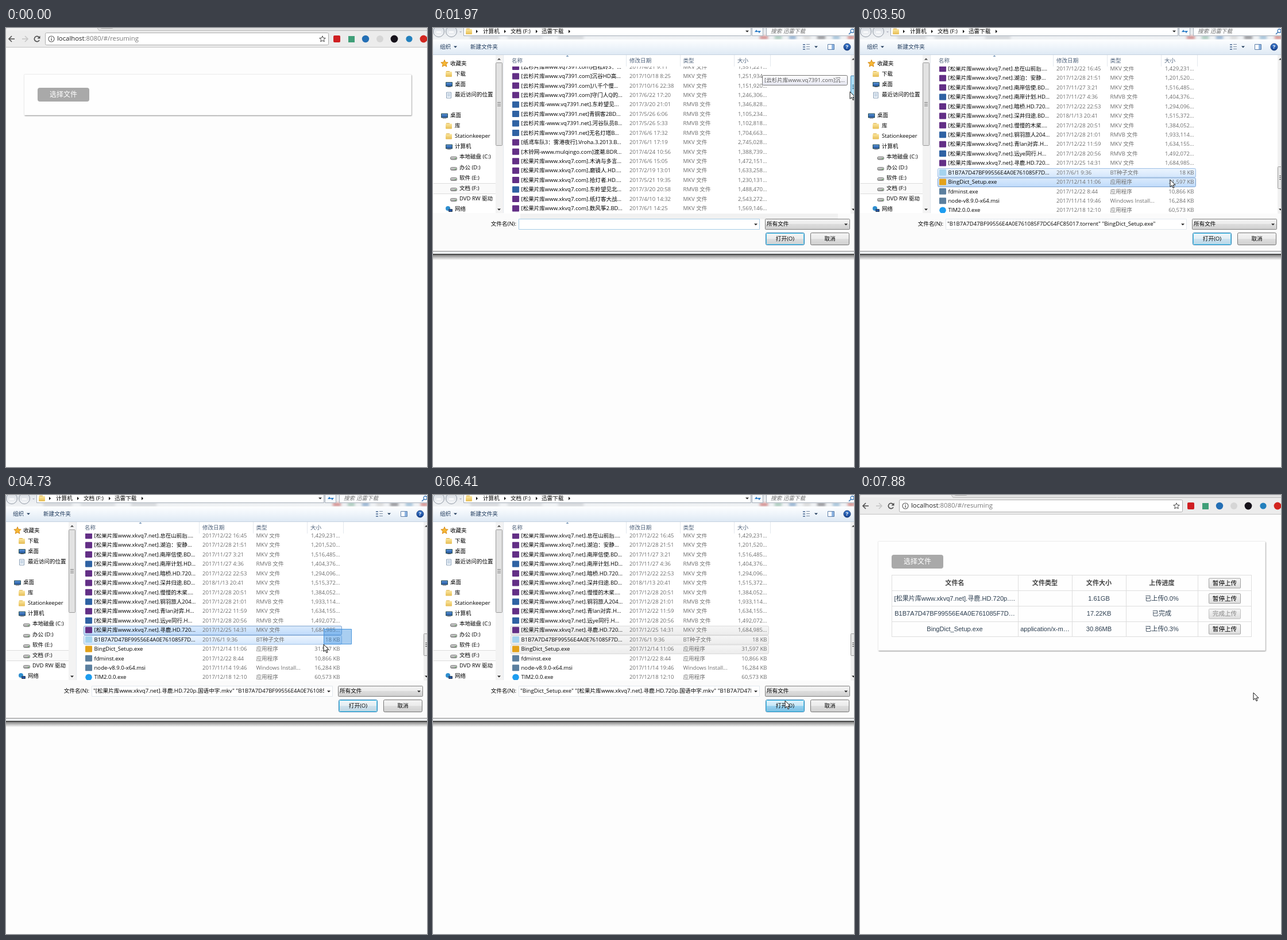
Animation of 733 by 764 pixels, one loop 8 s. Source, as an HTML page with a canvas:

```html
<!DOCTYPE html>
<html lang="zh">
<head>
<meta charset="utf-8">
<title>resuming</title>
<style>
html, body { margin: 0; width: 100%; height: 100%; overflow: hidden; background: #fdfdfd; }
canvas { display: block; }
</style>
</head>
<body>
<canvas id="stage" width="733" height="764"></canvas>
<script>
const ctx = document.getElementById('stage').getContext('2d');
const LOOP = 8000;
const UI = '"Open Sans", "Noto Sans CJK SC", sans-serif';
const WEB = '"Liberation Sans", "Noto Sans CJK SC", sans-serif';

// Runs of evenly spaced updates: start, gap, count
const RUNS = [[310, 134, 8], [1400, 142, 5], [2120, 120, 3], [2480, 145, 8], [3620, 137, 8],
  [4730, 150, 5], [5630, 130, 7], [6560, 120, 1], [6680, 132, 8], [7760, 120, 2]];
const OPEN = 846, CLOSE = 6560, START = 7470;

// Pointer path: time, x, y
const PATH = [[310, 240, 60], [712, 105, 114], [980, 105, 114], [1248, 190, 100], [1542, 600, 4],
  [1684, 728, 90], [1970, 726, 111], [2480, 697, 263], [2915, 600, 248], [3350, 540, 264],
  [3620, 540, 264], [4305, 602, 233], [4579, 575, 250], [4730, 553, 260], [4880, 548, 270],
  [5630, 548, 270], [6150, 613, 358], [6680, 613, 358], [7208, 640, 149], [7604, 640, 149], [7880, 685, 344]];
const SCROLL = [[1684, 0], [1970, 156], [2480, 1236]];
const DRAGS = [{ x: 600, y: 248, from: 2915, to: 3490 }, { x: 602, y: 233, from: 4305, to: 5030 }];

const PITCH = 16.43, ROWS = 103, MAX_SCROLL = ROWS * PITCH - 254;
const SITES = { A: '[云杉片库www.vq7391.com]', B: '[云杉片库-www.vq7391.net].', C: '[云杉片库www.vq7391.net]',
  D: '[木铃网-www.mulqingo.com]', E: '[松果片库www.xkvq7.com].', F: '[松果片库www.xkvq7.net].' };

const parse = list => list.trim().split('\n').map(line => {
  const [raw, date, size, type = 'MKV 文件', color] = line.split('|');
  const film = raw[1] === ' ';
  return {
    name: film ? (SITES[raw[0]] || '') + raw.slice(2) + '.国语中字.mkv' : raw,
    date, size: film ? size + '...' : size,
    type: type === 'R' ? 'RMVB 文件' : type,
    color: color || (type === 'R' ? '#2f62a3' : '#632f86')
  };
});

const early = parse(`
A 石松岭3：归乡|2017/4/21 9:11|1,551,221
A 沉谷HD高清|2017/10/18 8:25|1,251,934
A 八千个慢镜头|2017/10/16 22:38|1,151,920
A 守门人Q的来信|2017/6/22 17:20|1,246,306
B 东岭望见北湖|2017/3/20 21:01|1,346,828|R
C 青铜客2BD高清|2017/5/26 6:06|1,105,234|R
B 河谷队员BD|2017/5/26 5:33|1,102,818|R
C 无名灯塔BD高清|2017/6/6 17:32|1,704,663|R
- [纸鸢车队3：雾港夜行].Vroha.3.2013.BD|2017/6/1 17:19|2,745,028
D 渡潮.BDRip|2017/4/24 10:56|1,388,739
E 木讷与多言.HD|2017/6/6 15:05|1,472,151
E 磨镜人.HD.720p|2017/2/19 13:01|1,633,258
E 拾灯者.HD.720p|2017/5/21 19:35|1,230,131
E 东岭望见北湖|2017/3/20 20:58|1,488,470|R
E 纸灯客大战雨师|2017/4/10 14:32|2,543,272
E 数风筝2.BD.720p|2017/6/1 14:25|1,569,146`);

const late = parse(`
F 总在山前后.BD.720p|2017/12/22 16:45|1,429,231
F 湖泊：安静的一天|2017/12/28 21:51|1,201,520
F 南岸信使.BD.720p|2017/11/27 3:21|1,516,485
F 南岸计划.HD.720p|2017/11/27 4:36|1,404,376|R
F 暗桥.HD.720p|2017/12/22 22:53|1,294,096
F 深井归途.BD.720p|2018/1/13 20:41|1,515,372
F 慢慢的木桨.HD.720p|2017/12/28 20:51|1,384,052
F 铜羽旅人2047.HD|2017/12/28 21:01|1,933,114|R
F 青lan对弈.HD.720p|2017/12/22 11:59|1,634,155
F 远ye同行.HD.720p|2017/12/28 20:56|1,492,072|R
F 寻鹿.HD.720p|2017/12/25 14:31|1,684,985
B1B7A7D47BF99556E4A0E761085F7DC64FC85017.torrent|2017/6/1 9:36|18 KB|BT种子文件|#a5d3ee
BingDict_Setup.exe|2017/12/14 11:06|31,597 KB|应用程序|#e3a21a
fdminst.exe|2017/12/22 8:44|10,866 KB|应用程序|#5b7f9f
node-v8.9.0-x64.msi|2017/11/14 19:46|16,284 KB|Windows Install...|#5b7f9f
TIM2.0.0.exe|2017/12/18 12:10|60,573 KB|应用程序|#1d9df0`);

const rnd = (i, k) => { const v = Math.sin(i * 12.9 + k * 78.2) * 43758.5; return v - Math.floor(v); };

function fileRow(i) {
  if (i >= 9 && i < 25) return early[i - 9];
  if (i >= 75 && i < 91) return late[i - 75];
  const like = i < 9 ? early[i % 4] : late[Math.floor(rnd(i, 1) * 11)];
  const date = `2017/${1 + Math.floor(rnd(i, 2) * 12)}/${1 + Math.floor(rnd(i, 3) * 28)} ${Math.floor(rnd(i, 4) * 24)}:${10 + Math.floor(rnd(i, 5) * 50)}`;
  const size = (1e6 + Math.floor(rnd(i, 6) * 9e5)).toLocaleString('en-US') + '...';
  return { ...like, date, size };
}

// ---- timing ----
function snap(t) {
  let at = 0;
  for (const [start, gap, n] of RUNS)
    if (t >= start) at = start + gap * Math.min(n - 1, Math.floor((t - start) / gap));
  return at;
}

function track(keys, t) {
  const next = keys.findIndex(k => k[0] > t);
  if (next === 0) return keys[0].slice(1);
  if (next < 0) return keys[keys.length - 1].slice(1);
  const a = keys[next - 1], b = keys[next], p = (t - a[0]) / (b[0] - a[0]);
  return a.slice(1).map((v, i) => v + (b[i + 1] - v) * p);
}

// ---- drawing helpers ----
function box(x, y, w, h, fill, stroke, r = 0) {
  ctx.beginPath();
  if (stroke) ctx.roundRect(x + .5, y + .5, w - 1, h - 1, r); else ctx.roundRect(x, y, w, h, r);
  if (fill) { ctx.fillStyle = fill; ctx.fill(); }
  if (stroke) { ctx.strokeStyle = stroke; ctx.lineWidth = 1; ctx.stroke(); }
}

function disc(x, y, r, fill, stroke, width = 1) {
  ctx.beginPath();
  ctx.arc(x, y, r, 0, 7);
  if (fill) { ctx.fillStyle = fill; ctx.fill(); }
  if (stroke) { ctx.strokeStyle = stroke; ctx.lineWidth = width; ctx.stroke(); }
}

function shade(y0, y1, ...colors) {
  const g = ctx.createLinearGradient(0, y0, 0, y1);
  colors.forEach((c, i) => g.addColorStop(i / (colors.length - 1), c));
  return g;
}

// Two gradients that meet in a hard edge halfway
function gloss(y0, y1, a, b, c, d) {
  const g = ctx.createLinearGradient(0, y0, 0, y1);
  [[0, a], [.5, b], [.5, c], [1, d]].forEach(([p, color]) => g.addColorStop(p, color));
  return g;
}

function poly(points, fill, stroke, width = 1, open) {
  ctx.beginPath();
  points.forEach(([x, y]) => ctx.lineTo(x, y));
  if (!open) ctx.closePath();
  if (fill) { ctx.fillStyle = fill; ctx.fill(); }
  if (stroke) { ctx.strokeStyle = stroke; ctx.lineWidth = width; ctx.stroke(); }
}

function star(x, y, r, fill, stroke) {
  poly(Array.from({ length: 10 }, (_, i) => {
    const q = i % 2 ? r * .45 : r, a = i * Math.PI / 5;
    return [x + q * Math.sin(a), y - q * Math.cos(a)];
  }), fill, stroke);
}

function setFont(size, family, style = '') { ctx.font = `${style} ${size}px ${family}`; }

function text(s, x, y, color = '#000', align = 'left') {
  ctx.textAlign = align;
  ctx.textBaseline = 'middle';
  ctx.fillStyle = color;
  ctx.fillText(s, x, y);
}

function fit(s, width, dots = '...') {
  if (ctx.measureText(s).width <= width) return s;
  while (ctx.measureText(s + dots).width > width) s = s.slice(0, -1);
  return s + dots;
}

function clip(x, y, w, h, paint) {
  ctx.save();
  ctx.beginPath();
  ctx.rect(x, y, w, h);
  ctx.clip();
  paint();
  ctx.restore();
}

const down = (x, y, s = 3, c = '#222') => poly([[x - s, y - s / 2], [x + s, y - s / 2], [x, y + s / 2]], c);
const up = (x, y, s = 3, c = '#444') => poly([[x - s, y + s / 2], [x + s, y + s / 2], [x, y - s / 2]], c);
const right = (x, y) => poly([[x - 1, y - 3], [x + 2, y], [x - 1, y + 3]], '#111');

// ---- browser page ----
function browser() {
  box(0, 0, 733, 34, '#ececec');
  box(0, 0, 733, 4, '#e2e2e2');
  poly([[2, 0], [0, 4], [162, 4], [159, 0]], '#f2f2f2');
  poly([[159, 0], [162, 4.5], [733, 4.5]], null, '#b9b9b9', 1, true);
  box(164, -4, 23, 5, '#d6d6d6', '#a9a9a9', 2);
  box(0, 33, 733, 1, '#c3c3c3');
  const arrow = (x, d, c) => {
    poly([[x - 5 * d, 19], [x + 5 * d, 19]], null, c, 1.6, true);
    poly([[x, 14], [x + 5 * d, 19], [x, 24]], null, c, 1.6, true);
  };
  arrow(10, -1, '#505050');
  arrow(33, 1, '#c6c6c6');
  ctx.beginPath();
  ctx.arc(54, 19, 4.6, .5, 5.6);
  ctx.strokeStyle = '#505050';
  ctx.lineWidth = 1.6;
  ctx.stroke();
  poly([[59.5, 13.5], [59.5, 18.5], [54.5, 18.5]], '#505050');
  box(68, 8, 494, 22, '#fff', '#adadad', 2);
  disc(79, 19, 5, null, '#555', 1.1);
  box(78.4, 18, 1.3, 4, '#555');
  box(78.4, 15.8, 1.3, 1.3, '#555');
  setFont(11.35, UI);
  text('localhost', 89, 19, '#222');
  text(':8080/#/resuming', 89 + ctx.measureText('localhost').width, 19, '#777');
  star(551, 19.3, 5.5, null, '#444');
  box(570, 13, 12, 12, '#cf1f22', null, 2);
  box(596, 14, 11, 11, '#3f9f78');
  disc(626, 19, 6.2, '#246fb5');
  disc(651, 19, 6, '#d6d6d6');
  disc(676, 19, 6.4, '#16121a');
  disc(702, 19, 5.6, '#2380bd');
  disc(727, 19, 6.4, '#d3251f');
}

function card(h) {
  ctx.save();
  ctx.shadowColor = 'rgba(0,0,0,.42)';
  ctx.shadowBlur = 2;
  ctx.shadowOffsetX = ctx.shadowOffsetY = 1;
  box(31.5, 81, 674, h, '#fefefe', null, 1);
  ctx.restore();
  box(31, 80, 675, h + 1, '#fefefe', '#ebebeb', 1);
  box(55, 104, 90, 24, '#a9a9a9', null, 4);
  setFont(12, WEB);
  text('选择文件', 100, 116.5, '#fff', 'center');
}

function webButton(label, y, off) {
  box(607, y - 9, 56, 18, shade(y - 9, y + 9, '#f7f7f7', '#dcdcdc'), off ? '#c2c2c2' : '#a2a2a2', 1);
  setFont(10.6, WEB);
  text(label, 635, y + .5, off ? '#8a8a8a' : '#000', 'center');
}

function table(t) {
  const cols = [55, 275, 369, 463, 588, 682], lines = [139, 166, 193, 220, 246];
  const on = t >= START, done = t >= 7600;
  const pct = t >= 7880 ? '0.3' : t >= 7760 ? '0.1' : '0.0';
  const data = [['文件名', '文件类型', '文件大小', '上传进度'],
    [late[10].name, '', '1.61GB', '已上传0.0%'],
    [late[11].name, '', '17.22KB', done ? '已完成' : '已上传0.0%'],
    [late[12].name, 'application/x-msdownload', '30.86MB', `已上传${pct}%`]];
  lines.forEach(y => box(55, y, 627, 1, '#dedede'));
  cols.forEach(x => box(x - (x > 600 ? 1 : 0), 139, 1, 108, '#dedede'));
  data.forEach((cells, r) => {
    const y = 153.5 + r * 26.7;
    cells.forEach((s, c) => {
      setFont(11.1, WEB, r ? '' : 'bold');
      text(fit(s, cols[c + 1] - cols[c] - 7, '…'), (cols[c] + cols[c + 1]) / 2, y + .5, r ? '#2c3e50' : '#444', 'center');
    });
    const finished = r === 2 && done;
    webButton(finished ? '完成上传' : on ? '暂停上传' : '开始上传', y, finished);
  });
}

// ---- file dialog ----
function drive(x, y) {
  box(x, y - 1, 12, 6, shade(y - 1, y + 5, '#e6e6e6', '#8c8c8c'), '#777', 2);
  box(x + 8, y + 2, 2, 1, '#3a3');
}
function folder(x, y) {
  box(x + 1, y - 5, 6, 3, '#d9a93c');
  box(x, y - 4, 11, 9, shade(y - 4, y + 5, '#fbe7a0', '#e6bd54'), null, 1);
}
function screen(x, y) {
  box(x, y - 4, 12, 8, shade(y - 4, y + 4, '#5f9be0', '#1c4c94'), '#355');
  box(x + 3, y + 4, 6, 1, '#667');
}
function sheet(x, y) {
  box(x + 1, y - 5, 9, 11, '#f4f8fc', '#8aa0b8');
  box(x + 3, y - 2, 5, 1, '#7d9dc0');
  box(x + 3, y + 1, 5, 1, '#7d9dc0');
}
function globe(x, y) {
  disc(x + 4, y - 1, 4, '#2f8fd0');
  box(x + 5, y, 7, 5, '#2553a0', '#345');
}

const NAV = [[0, 62, '收藏夹', (x, y) => star(x + 6, y, 6.5, '#f7b733', '#d58a17')], [1, 80, '下载', folder],
  [1, 98, '桌面', screen], [1, 116.5, '最近访问的位置', sheet], [0, 152.5, '桌面', screen], [1, 170.5, '库', folder],
  [1, 188.5, 'Stationkeeper', folder], [1, 206.5, '计算机', screen], [2, 224.5, '本地磁盘 (C:)', drive],
  [2, 243, '办公 (D:)', drive], [2, 261, '软件 (E:)', drive], [2, 279, '文档 (F:)', drive],
  [2, 297, 'DVD RW 驱动', drive], [1, 315, '网络', globe]];

function frameTop() {
  box(0, 0, 733, 20, shade(0, 20, '#e4e8ec', '#f1f3f5'));
  clip(0, 0, 733, 20, () => {
    ctx.filter = 'blur(2px)';
    [[90, 25, '#d0d3d7'], [160, 30, '#d5d8dc'], [240, 22, '#cfd2d6'], [576, 7, '#cf7f7f'], [601, 6, '#9cc2b1'],
      [626, 6, '#84a6ca'], [651, 6, '#d5d5d5'], [676, 7, '#85858a'], [702, 6, '#94b8d4'], [728, 6, '#d27f7b']]
      .forEach(([x, w, c]) => box(x - w, 14, w * 2, 5, c));
  });
  [10, 32].forEach(x => {
    disc(x, 6, 9.5, shade(-4, 16, '#d5dae0', '#f6f8fa'), '#8f98a3');
    box(x - 4, 6, 8, 2, '#fff');
  });
  down(48, 7, 2, '#aab');
  box(53, -3, 501, 17, '#fff', '#a4adb8');
  box(555, -3, 20, 17, '#f6f9fc', '#a4adb8');
  box(580, -3, 160, 17, '#fdfeff', '#a4adb8');
  folder(57, 6);
  [76, 125, 180, 237].forEach(x => right(x, 6));
  setFont(9.6, UI);
  text('计算机', 87, 6);
  text('文档 (F:)', 135, 6);
  text('迅雷下载', 189, 6);
  down(547, 6);
  poly([[560, 7], [563, 3], [566, 7]], '#2f7fc8');
  poly([[565, 5], [568, 9], [571, 5]], '#2f7fc8');
  setFont(9.6, UI, 'italic');
  text('搜索 迅雷下载', 588, 6, '#6d6d6d');
  disc(730, 5, 3, null, '#3c78b8', 1.3);
  poly([[728, 7], [724, 11]], null, '#3c78b8', 1.6, true);
}

function toolbar() {
  box(0, 20, 733, 27, shade(20, 47, '#fdfeff', '#eef4fa', '#dde8f3'));
  box(0, 46, 733, 1, '#c5d2e0');
  setFont(9.6, UI);
  text('组织', 12, 33.5, '#1e395b');
  down(39, 33, 3, '#1e395b');
  text('新建文件夹', 65, 33.5, '#1e395b');
  [29, 33, 37].forEach(y => {
    box(644, y - 1, 4, 2, '#6c86a8');
    box(650, y - 1, 6, 1, '#7c8ea5');
  });
  down(667, 33, 3, '#1e395b');
  box(687, 28, 12, 10, '#fff', '#5c7ea8');
  box(694, 29, 4, 8, '#8db4e2');
  disc(721, 33, 6, shade(27, 39, '#3f80d4', '#123f8f'), '#1a3c78');
  setFont(9, UI, 'bold');
  text('?', 721, 33.5, '#fff', 'center');
}

function navPane() {
  box(0, 47, 122, 276, '#fff');
  box(122, 47, 1, 276, '#e3e8ee');
  box(1, 270, 108, 19, '#fafafa');
  box(1, 270, 108, 1, '#dcdcdc');
  box(1, 288, 108, 1, '#dcdcdc');
  setFont(9.5, UI);
  clip(0, 47, 108.5, 276, () => NAV.forEach(([level, y, label, icon]) => {
    icon(14 + level * 8, y);
    text(label, 30 + level * 8, y + .5);
  }));
  box(109, 47, 13, 276, '#f3f3f3');
  up(115, 54);
  down(115, 316);
  box(109, 60, 12, 145, '#e2e2e2', '#999', 1);
  [129, 132, 135].forEach(y => box(112, y, 6, 1, '#777'));
}

function selection(t, pos) {
  const drag = DRAGS.filter(d => t >= d.from).pop();
  if (!drag) return { rows: [] };
  const bottom = track(PATH, Math.min(t, drag.to))[1];
  const index = y => Math.floor((y + 1236 - 75) / PITCH + .5);
  const rows = [];
  for (let i = index(drag.y); i <= index(bottom); i++) rows.push(i);
  const active = t < drag.to;
  return { rows, band: active && drag, strong: active ? index(drag.y) : index(pos[1]) };
}

function rowBack(y, gray, strong) {
  const [a, b, line] = gray ? ['#f6f6f6', '#ececec', '#d9d9d9']
    : strong ? ['#dcebfc', '#bfdbfb', '#7da2ce'] : ['#edf5fe', '#d3e6fc', '#9dbfe6'];
  box(135, y - 8, 450, 16.5, shade(y - 8, y + 8, a, b), line, 2);
}

function listPane(t, scroll, sel) {
  box(123, 47, 610, 276, '#fff');
  setFont(9.55, UI);
  clip(124, 67, 603, 255, () => {
    const first = Math.max(0, Math.floor(scroll / PITCH) - 1);
    for (let i = first; i < first + 18 && i < ROWS; i++) {
      const f = fileRow(i), y = 75 + i * PITCH - scroll;
      if (sel.rows.includes(i)) rowBack(y, t >= 6280, i === sel.strong);
      if (f.type === '应用程序' && f.name[0] === 'T') disc(144, y - .5, 5.8, f.color);
      else box(138, y - 6, 12, 11, f.color, null, 1);
      text(fit(f.name, 177), 153.5, y + .3);
      text(f.date, 342, y + .3, '#6d6d6d');
      text(f.type, 435.5, y + .3, '#6d6d6d');
      text(f.size, 581.5, y + .3, '#6d6d6d', 'right');
    }
  });
  [['名称', 137], ['修改日期', 342], ['类型', 435.5], ['大小', 530]].forEach(([s, x]) => text(s, x, 57.5, '#4c607a'));
  [336, 430, 524, 587].forEach(x => box(x, 47, 1, 20, '#e3e8ee'));
  up(234, 48.5, 2.5, '#6a8cb0');
  box(727, 47, 6, 276, '#f1f1f1');
  up(732, 54);
  down(732, 316);
  const top = 60 + scroll * .1464, held = t >= 1684 && t < 3000;
  box(727, top, 20, 39, held ? '#a9dcf5' : '#e6e6e6', held ? '#3c7fb1' : '#999', 1);
  [-3, 0, 3].forEach(d => box(730, Math.round(top) + 19 + d, 4, 1, held ? '#17506f' : '#555'));
}

function dialogButton(x, label, border, glow = 0, pressed) {
  box(x, 356, 68, 22, gloss(357, 378, '#f3f3f3', '#ebebeb', '#dddddd', '#cfcfcf'), border, 2);
  if (glow) {
    ctx.globalAlpha = glow;
    box(x + 1, 357, 66, 20, pressed ? gloss(357, 378, '#e2f3fc', '#c4e5f6', '#98d1ef', '#78bbe0')
      : gloss(357, 378, '#eaf6fd', '#d9f0fc', '#bee6fd', '#a7d9f5'), null, 1);
    ctx.globalAlpha = 1;
    box(x + 1, 357, 66, 20, null, '#54cdf0', 1);
  }
  setFont(9.6, UI);
  text(label, x + 34, 367.5, '#000', 'center');
}

function footer(t, sel) {
  box(0, 322, 733, 66, '#fbfbfb');
  if (t >= 1400 && t < 2480) box(152, 323, 553, 10, '#f1f1f1');
  setFont(9.6, UI);
  text('文件名(N):', 145, 341.5, '#000', 'right');
  const names = sel.rows.map(i => fileRow(i).name);
  if (names.length > 2) names.unshift(names.pop());
  box(149, 332, 420, 19, '#fff', names.length ? '#e2e8ee' : '#a6cde6');
  const value = names.length > 1 ? names.map(n => `"${n}"`).join(' ') : names[0] || '';
  clip(150, 333, 404, 17, () => text(value, 152, 341.5));
  down(562, 342);
  box(578, 332, 148, 19, gloss(332, 351, '#f3f3f3', '#ebebeb', '#dddddd', '#cfcfcf'), '#808080', 1);
  text('所有文件', 581, 341.5);
  down(719, 342);
  const pulse = .45 - .4 * Math.cos((t - 1970) / 2200 * Math.PI * 2);
  const pressed = t >= 6150;
  dialogButton(579, '打开(O)', '#3c7fb1', pressed ? 1 : pulse, pressed);
  dialogButton(657, '取消', '#757575');
  box(0, 388, 733, 1, '#8b8b8b');
  box(0, 389, 733, 5, '#ebedef');
  box(0, 393, 733, 2, '#4a4a4a');
  box(0, 395, 733, 9, shade(395, 404, '#858585', '#c4c4c4', '#fdfdfd'));
}

function dialog(t, pos) {
  const [scroll] = track(SCROLL, t), sel = selection(t, pos);
  frameTop();
  toolbar();
  navPane();
  footer(t, sel);
  listPane(t, scroll, sel);
  if (t >= 1800 && t < 2600) {
    const i = Math.floor(scroll / MAX_SCROLL * ROWS - .4);
    box(573, 82, 149, 18, shade(82, 100, '#fff', '#e4e5f0'), '#767676', 2);
    setFont(9.55, UI);
    text(fit(fileRow(Math.max(0, i)).name, 141), 577, 91.5, '#575757');
  }
  if (sel.band) {
    const { x, y } = sel.band;
    const w = x - pos[0], h = pos[1] - y;
    if (w > 1 && h > 1) box(pos[0], y, w, h, 'rgba(51,138,222,.42)', '#4b97de');
  }
}

function pointer([x, y]) {
  poly([[0, 0], [0, 12.5], [3, 9.8], [5, 14.5], [7, 13.7], [5, 9.2], [9, 9.2]].map(([a, b]) => [x + a, y + b]), '#fff', '#111');
}

function draw(t) {
  box(0, 0, 733, 764, '#fdfdfd');
  const pos = track(PATH, t);
  if (t >= OPEN && t < CLOSE) dialog(t, pos);
  else {
    browser();
    card(t >= CLOSE ? 190 : 71);
    if (t >= CLOSE) table(t);
  }
  if (t >= 310) pointer(pos);
}

let last = -1;
const begin = performance.now();
function tick() {
  const t = snap((performance.now() - begin) % LOOP);
  if (t !== last) draw(last = t);
  requestAnimationFrame(tick);
}
tick();
</script>
</body>
</html>
```
